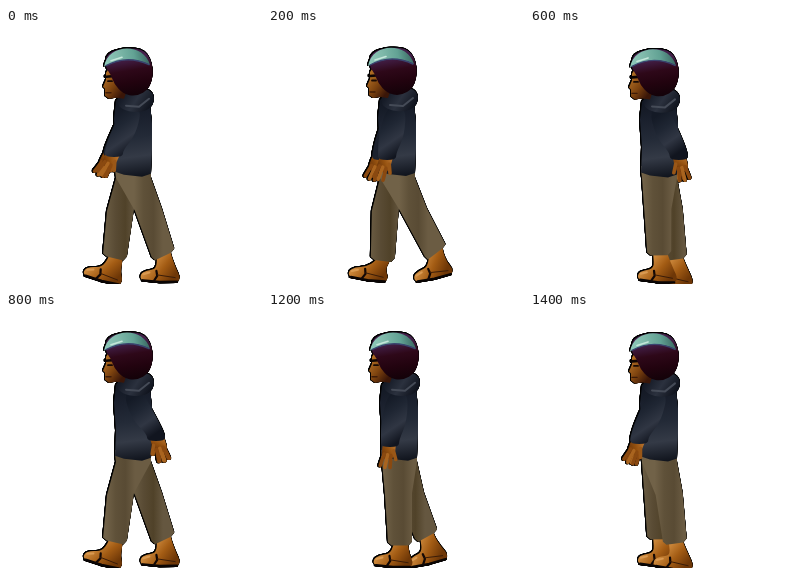
An HTML page with a canvas that plays this animation: 256x256 px, repeating every 1600 ms.

```html
<!DOCTYPE html>
<html lang="en">
<head>
<meta charset="utf-8">
<title>Walk cycle</title>
<style>
html, body { margin: 0; width: 100%; height: 100%; overflow: hidden; background: #fff; }
canvas {
  display: block;
  filter: drop-shadow(.6px 0 0 #000) drop-shadow(-.6px 0 0 #000)
    drop-shadow(0 .6px 0 #000) drop-shadow(0 -.6px 0 #000);
}
</style>
</head>
<body>
<canvas id="stage" width="256" height="256"></canvas>
<script>
const ctx = document.getElementById('stage').getContext('2d');
const STEP = 200, POSES = 8;
const { sin, cos, PI, hypot, atan2 } = Math;

// Cyclic motion: a mean plus the first two harmonics of the stride
const wave = (a, mean, c1, s1 = 0, c2 = 0, s2 = 0) =>
  mean + c1 * cos(a) + s1 * sin(a) + c2 * cos(2 * a) + s2 * sin(2 * a);

const sway = a => -2 * cos(2 * a);
const bob = a => .7 * (1 - sin(2 * a));

function shade(x0, y0, x1, y1, ...colors) {
  const g = ctx.createLinearGradient(x0, y0, x1, y1);
  colors.forEach((c, i) => g.addColorStop(i / (colors.length - 1), c));
  return g;
}

// Closed smooth curve through the midpoints of a polygon
function blob(pts, fill) {
  const n = pts.length;
  const mid = i => [0, 1].map(k => (pts[i % n][k] + pts[(i + 1) % n][k]) / 2);
  ctx.beginPath();
  ctx.moveTo(...mid(n - 1));
  for (let i = 0; i < n; i++) ctx.quadraticCurveTo(...pts[i], ...mid(i));
  ctx.fillStyle = fill;
  ctx.fill();
}

function poly(pts, fill) {
  ctx.beginPath();
  pts.forEach(p => ctx.lineTo(...p));
  ctx.fillStyle = fill;
  ctx.fill();
}

function stroke(pts, color, width) {
  ctx.beginPath();
  pts.forEach(p => ctx.lineTo(...p));
  ctx.strokeStyle = color;
  ctx.lineWidth = width;
  ctx.stroke();
}

function foot(a, cx, cy) {
  const x = wave(a, 134, -29, -18, -9, -1);
  const y = wave(a, 252.5, -.5, 1.5, 0, -2);
  const tilt = wave(a, .03, .11, .14, .12, -.07);
  const at = (u, v) => [x + u * cos(tilt) - v * sin(tilt), y + u * sin(tilt) + v * cos(tilt)];
  const skin = shade(...at(-12, -15), ...at(10, 0), '#cf8b3e', '#a35c14', '#6e3707');
  blob([[cx - 6, cy - 6], [cx - 6, cy + 3], at(-4, -12), at(-14, -10), at(-20, -6), at(-19, 1),
    at(0, 0), at(18, 1), at(20, -5), at(16, -12), [cx + 8, cy + 2], [cx + 7, cy - 6]], skin);
  stroke([at(-17, -6), at(-11, -8)], '#d99a52', 2);
  stroke([at(-17, 0), at(0, 1), at(17, 0)], '#0a0504', 2.4);
  stroke([at(-6, 0), at(-3, -5), at(-4, -10)], '#120806', 2.2);
  stroke([at(-3, -6), at(15, -4)], '#3a1c08', 1);
}

function leg(a, hip, near) {
  const kx = wave(a, 132, -14, -6, -4, -1), ky = 185;
  const cx = wave(a, 139, -24, -13, -6, 2), cy = wave(a, 226, 1, 4);
  foot(a, cx, cy);
  const len = hypot(cx - kx, cy - ky);
  const px = 12 * (cy - ky) / len, py = -12 * (cx - kx) / len;
  const cloth = near
    ? shade(kx - 14, 0, kx + 15, 0, '#716248', '#5f5139', '#594b34', '#6b5c43')
    : shade(kx - 14, 0, kx + 15, 0, '#695b42', '#594b34', '#504229', '#655740');
  poly([[hip - 18, 138], [hip - 17, 150], [kx - 13, ky - 2], [cx - px, cy - py], [cx - px * .7, cy - py + 3],
    [cx + px * .7, cy + py + 4], [cx + px, cy + py], [kx + 14, ky - 4], [hip + 18, 150], [hip + 18, 138]], cloth);
}

function hand(x, y, angle) {
  ctx.save();
  ctx.translate(x, y);
  ctx.rotate(angle);
  const skin = shade(0, -7, 14, 8, '#bf7a33', '#93500f', '#5e2d08');
  blob([[-8, -5], [6, -7], [16, -6], [17, 5], [7, 7], [-8, 5]], skin);
  for (let i = -1; i <= 1; i++) {
    stroke([[12, i * 3.5], [20, i * 4.5], [25 - i * i, i * 5]], i ? '#8a4910' : '#a9641f', 3.6);
  }
  const side = x < 129 ? -1 : 1;
  stroke([[7, 5 * side], [15, 9 * side]], '#9a5717', 3.6);
  ctx.restore();
}

function arm(a, sx, sy, near) {
  const wx = near ? wave(a, 129, -21, 7) : wave(a, 128, -23);
  const wy = wave(a, 128, 0, 0, -3);
  hand(wx, wy, atan2(24, wave(a, -3, -11, near ? 2 : 0)));
  const ex = (sx + wx) / 2, ey = (sy + wy) / 2;
  const w = near ? 9 : 7.5;
  const cloth = near
    ? shade(ex - 12, ey - 20, ex + 12, ey + 15, '#141a26', '#1f2633', '#303643', '#11151f')
    : shade(ex - 11, 0, ex + 11, 0, '#1c222e', '#151a25', '#0e121a');
  blob([[sx - 9, sy - 9], [ex - w - 4, ey], [wx - w, wy - 3], [wx - w, wy + 4],
    [wx + w, wy + 4], [wx + w, wy - 3], [ex + w + 4, ey], [sx + 10, sy - 9]], cloth);
}

function torso() {
  poly([[117, 67], [112, 72], [110, 90], [112, 118], [111, 143], [120, 146],
    [138, 148], [147, 145], [148, 120], [148, 95], [146, 76]],
    shade(120, 70, 130, 148, '#121722', '#1a202d', '#232a37', '#343a46', '#11151e'));
}

function hood() {
  blob([[114, 66], [128, 65], [143, 59], [151, 67], [148, 79], [136, 84], [121, 82], [113, 76]],
    shade(118, 66, 143, 82, '#141925', '#2b313e', '#11151f'));
  stroke([[122, 77], [135, 78], [145, 70]], '#454b57', 2);
}

function head() {
  poly([[106, 38], [102, 44], [102, 51], [99, 58], [101, 60], [101, 67], [105, 70],
    [112, 69], [120, 70], [124, 58], [118, 42]],
    shade(100, 50, 119, 64, '#ad6a22', '#7d430f', '#3a1608'));
  stroke([[102, 48], [108, 47.5]], '#0d0504', 2.6);
  stroke([[104, 52.5], [108, 52.5]], '#180a04', 1.8);
  stroke([[102, 64], [107, 64]], '#3f1c08', 1.4);

  blob([[101, 38], [103, 24], [122, 19], [142, 21], [150, 40], [146, 60],
    [132, 68], [119, 65], [110, 55], [107, 46]],
    shade(122, 30, 128, 66, '#43204a', '#2e0819', '#22030f', '#140209'));
  ctx.beginPath();
  ctx.moveTo(100, 38);
  ctx.bezierCurveTo(104, 14, 140, 14, 146, 36);
  ctx.quadraticCurveTo(123, 25, 100, 38);
  ctx.fillStyle = shade(100, 36, 146, 28, '#8fcabb', '#7fb9aa', '#62a294', '#37645f');
  ctx.fill();
  ctx.beginPath();
  ctx.moveTo(102, 37);
  ctx.quadraticCurveTo(123, 25.5, 145, 36);
  ctx.strokeStyle = '#39446f';
  ctx.lineWidth = 1.4;
  ctx.stroke();
  stroke([[107, 32], [118, 28.5]], '#c4e6da', 1.6);
}

function draw(pose) {
  const a = pose / POSES * 2 * PI;
  const dx = sway(a), dy = bob(a);
  const lifted = part => {
    ctx.save();
    ctx.translate(dx, dy);
    part();
    ctx.restore();
  };
  ctx.clearRect(0, 0, 256, 256);
  ctx.lineJoin = ctx.lineCap = 'round';
  arm(a, 128 + dx, 87 + dy, false);
  leg(a, 129 + dx, false);
  leg(a + PI, 129 + dx, true);
  lifted(torso);
  arm(a, 128 + dx, 87 + dy, true);
  lifted(hood);
  lifted(head);
}

const start = performance.now();
function tick() {
  draw(Math.floor((performance.now() - start) / STEP) % POSES);
  requestAnimationFrame(tick);
}
tick();
</script>
</body>
</html>
```
